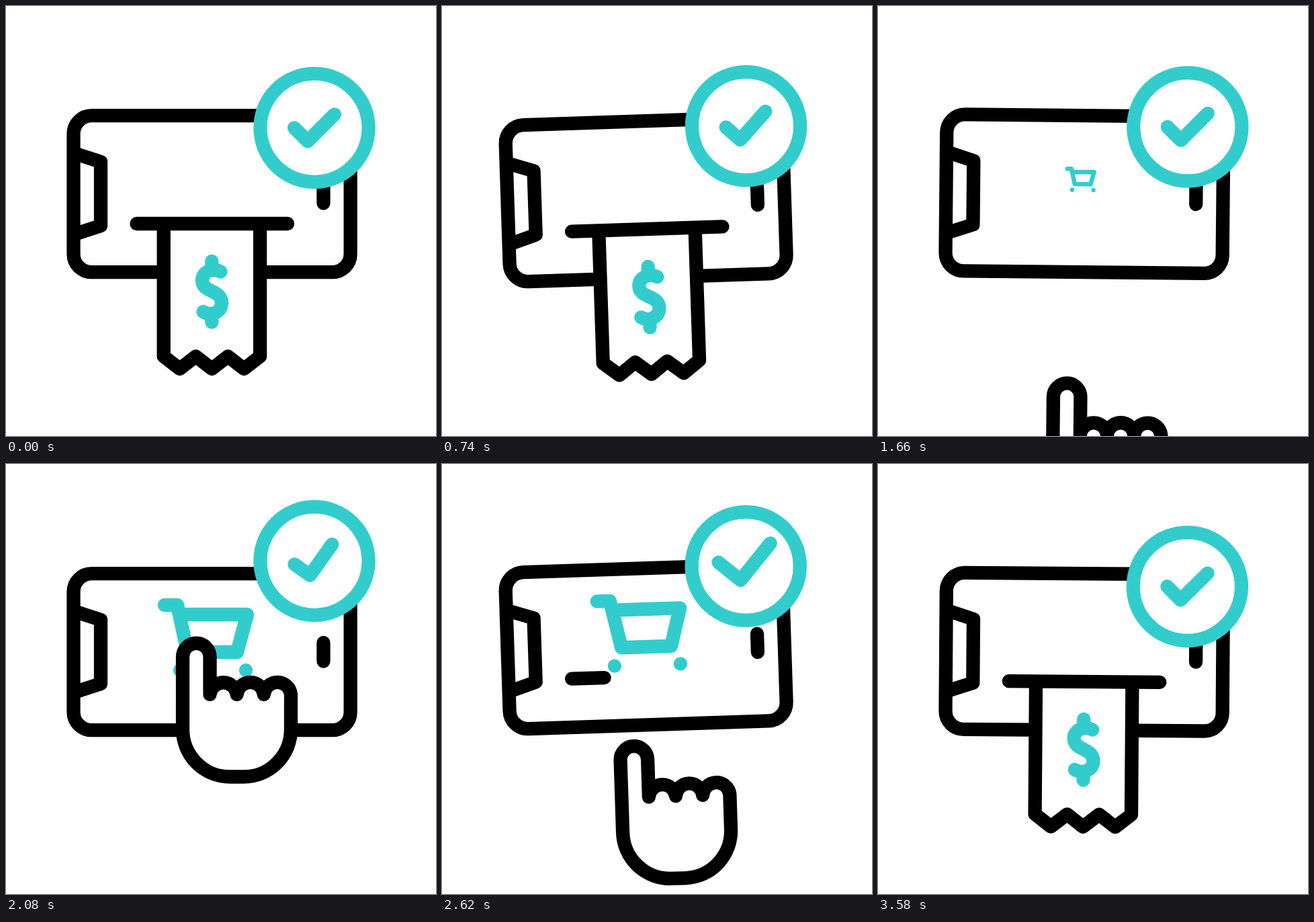
These frames come from a looping animation (640 by 640 pixels, 3.6 s). An HTML page with a canvas:

```html
<!DOCTYPE html>
<html lang="en">
<head>
<meta charset="utf-8">
<title>Mobile payment</title>
<style>
html, body { margin: 0; width: 100%; height: 100%; overflow: hidden; background: #fff; }
canvas { display: block; width: 640px; height: 640px; }
</style>
</head>
<body>
<canvas id="stage" width="640" height="640"></canvas>
<script>
const ctx = document.getElementById('stage').getContext('2d');
const LOOP = 3600, STEP = 20, LINE = 20.3;
const BLACK = '#000', TEAL = '#33cccc', WHITE = '#fff';
const PIVOT = { x: 306.5, y: 370 };
const BADGE = { x: 459, y: 181.3, r: 80.6 };
const SLOT = { x: 194.5, y: 324, length: 224.5 };

const linear = p => p;
const smooth = p => (1 - Math.cos(Math.PI * p)) / 2;

// Each key is [time, value, easing towards this key].
function track(...keys) {
  return t => {
    if (t <= keys[0][0]) return keys[0][1];
    for (let i = 1; i < keys.length; i++) {
      const [t0, v0] = keys[i - 1], [t1, v1, ease = linear] = keys[i];
      if (t <= t1) return v0 + (v1 - v0) * ease((t - t0) / (t1 - t0));
    }
    return keys[keys.length - 1][1];
  };
}

const tilt = track([200, 0], [740, -1.88], [1280, 1.88], [1820, 0],
  [2080, 0], [2620, -1.88], [3160, 1.88], [3700, 0]);
const bob = track([200, 0], [500, -8, smooth], [740, 8, smooth], [1000, 10, smooth],
  [1280, 3], [1450, 0], [2400, 0], [2620, -8, smooth], [3080, 10.5, smooth], [3580, 0, smooth]);
const badgeShift = track([200, 0], [545, -60, smooth], [905, 36, smooth], [1180, 36],
  [1280, 30], [1800, -15], [2080, -37], [2340, -56], [2460, -60],
  [2800, 36, smooth], [3110, 35.6], [3580, 0]);
const checkStretch = track([2460, 0], [2620, 14, smooth], [2780, 0, smooth]);
const slotSize = track([1150, 1], [1400, 0], [2540, 0], [2910, 1]);
const cartSize = track([1560, 0], [1820, 1, smooth], [2720, 1], [2940, 0, smooth]);
const handShift = track([1480, 385], [2040, 0, smooth], [2410, 0], [2880, 385, smooth]);
const printShift = track([3110, -235], [3400, 0, smooth]);

function receiptShift(t) {
  if (t > 2400) return printShift(t);
  const fall = Math.max(0, t - 990);
  return 0.00172 * fall * fall / 2;
}

function zigzag(x, y, right, drop) {
  const points = [];
  for (let i = 0; i <= 6; i++) {
    const k = right ? i : 6 - i;
    points.push(`${x + k * 23.9} ${y + (k % 2) * drop}`);
  }
  return points.join('L');
}

const notch = new Path2D('M101 219L141 232V327L101 340');
const button = new Path2D('M472.5 266V293.5');
const receipt = new Path2D(`M${zigzag(234.7, 302, true, 20)}L${zigzag(234.7, 521.5, false, 18.5)}Z`);
const dollar = new Path2D('M319.5 395.5C308 389.5 292 395 292 408.5' +
  'C292 427 321 422 321 442C321 456 305 462 293.5 455' +
  'M306.3 380V393M306.3 458V470.5');
const cart = new Path2D('M236 210H255L270 280H344L359 224H258');
const hand = new Path2D('M303.5 343V287A20.2 20.2 0 0 0 263 287V395' +
  'A70 70.5 0 0 0 333 465.5H354A70 70.5 0 0 0 424 395V343' +
  'A20.2 20.2 0 0 0 383.8 343A20.2 20.2 0 0 0 343.6 343A20.2 20.2 0 0 0 303.5 343');
const phone = new Path2D();
phone.roundRect(100.5, 163.2, 412.2, 233, 27);
const wheels = new Path2D();
for (const x of [259, 357]) {
  wheels.moveTo(x + 10.2, 307);
  wheels.arc(x, 307, 10.2, 0, 2 * Math.PI);
}

function shape(path, color, fill) {
  if (fill) {
    ctx.fillStyle = fill;
    ctx.fill(path);
  }
  ctx.strokeStyle = color;
  ctx.stroke(path);
}

function group(draw) {
  ctx.save();
  draw();
  ctx.restore();
}

function drawCart(t) {
  const size = cartSize(t);
  if (size <= 0) return;
  group(() => {
    ctx.translate(302, 258);
    ctx.scale(size, size);
    ctx.translate(-302, -258);
    shape(cart, TEAL);
    ctx.fillStyle = TEAL;
    ctx.fill(wheels);
  });
}

function drawReceipt(t) {
  const shift = receiptShift(t);
  if (shift > 400 || shift < -234) return;
  group(() => {
    ctx.beginPath();
    ctx.rect(0, SLOT.y, 640, 640);
    ctx.clip();
    ctx.translate(0, shift);
    shape(receipt, BLACK, WHITE);
    shape(dollar, TEAL);
  });
}

function drawSlot(t) {
  const size = slotSize(t);
  if (size <= 0) return;
  const bar = new Path2D();
  bar.moveTo(SLOT.x, SLOT.y);
  bar.lineTo(SLOT.x + SLOT.length * size, SLOT.y);
  shape(bar, BLACK);
}

function drawHand(t) {
  const shift = handShift(t);
  if (shift >= 385) return;
  group(() => {
    ctx.translate(0, shift);
    shape(hand, BLACK, WHITE);
  });
}

function drawBadge(t) {
  const shift = badgeShift(t), reach = checkStretch(t) * Math.SQRT1_2;
  const ring = new Path2D(), check = new Path2D();
  ring.arc(0, 0, BADGE.r, 0, 2 * Math.PI);
  check.moveTo(-30 - reach, -reach);
  check.lineTo(-10, 20);
  check.lineTo(30 + reach, -20 - reach);
  group(() => {
    ctx.translate(BADGE.x, BADGE.y + shift);
    shape(ring, TEAL, WHITE);
    ctx.rotate(shift * 0.26 * Math.PI / 180);
    shape(check, TEAL);
  });
}

function render(t) {
  ctx.fillStyle = WHITE;
  ctx.fillRect(0, 0, 640, 640);
  ctx.lineWidth = LINE;
  ctx.lineCap = ctx.lineJoin = 'round';
  group(() => {
    ctx.translate(PIVOT.x, PIVOT.y + bob(t));
    ctx.rotate(tilt(t) * Math.PI / 180);
    ctx.translate(-PIVOT.x, -PIVOT.y);
    shape(phone, BLACK);
    shape(notch, BLACK);
    shape(button, BLACK);
    drawCart(t);
    drawReceipt(t);
    drawSlot(t);
    drawHand(t);
    drawBadge(t);
  });
}

function tick() {
  const t = performance.now() % LOOP;
  render(Math.floor(t / STEP) * STEP);
  requestAnimationFrame(tick);
}
tick();
</script>
</body>
</html>
```
